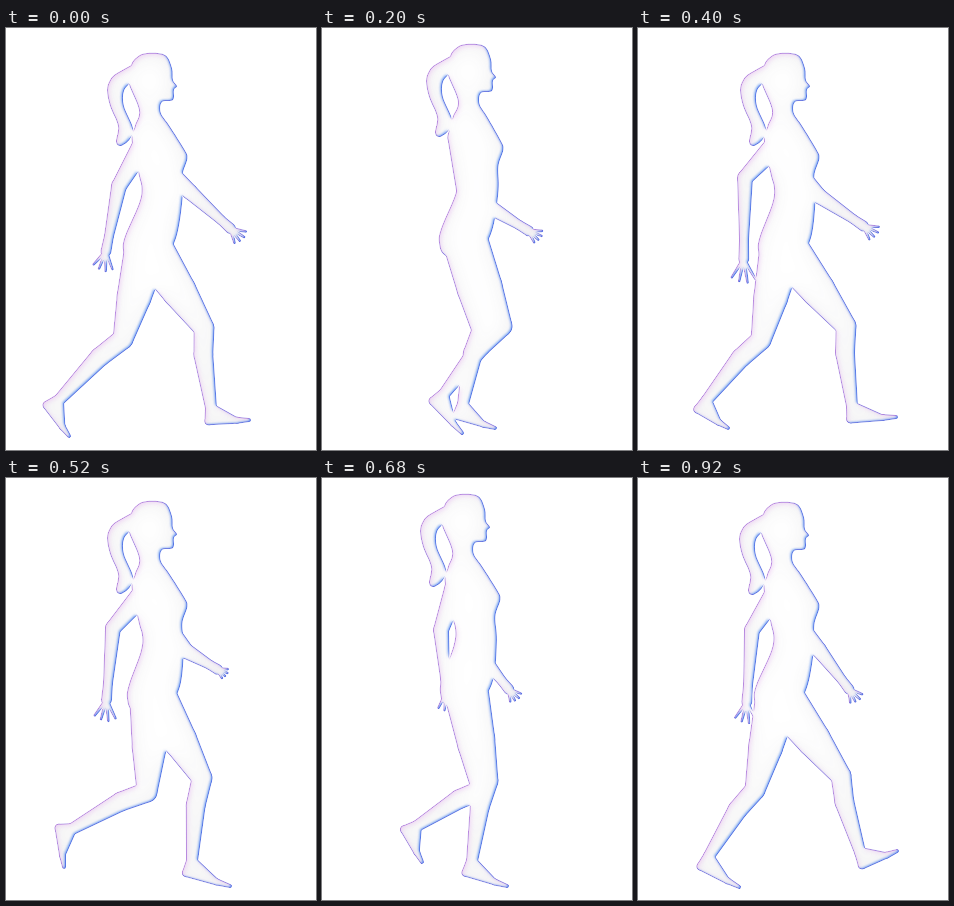
Recreate the animation shown at these times as an HTML page with a canvas. Size 310 by 422 pixels, loop 1000 ms.

```html
<!DOCTYPE html>
<html lang="en">
<head>
<meta charset="utf-8">
<title>Walk cycle</title>
<style>
html, body { margin: 0; width: 100%; height: 100%; overflow: hidden; background: #fff; }
canvas { display: block; }
</style>
</head>
<body>
<canvas id="stage" width="310" height="422"></canvas>
<script>
const W = 310, H = 422, STEPS = 15, LOOP = 1000;
const view = document.getElementById('stage').getContext('2d');
const layer = () => {
  const c = document.createElement('canvas');
  c.width = W;
  c.height = H;
  return c.getContext('2d');
};
const mask = layer(), outside = layer(), rim = layer();

// Contours of the standing body and the ponytail, as x, y pairs.
const BODY = [
  141,25, 159,27, 166,40, 167,52, 171,58, 168,62, 167,72, 156,74, 155,85, 164,98,
  179,121, 182,130, 177,147, 177,170, 171,207, 160,228, 140,240, 122,234, 117,222,
  119,208, 133,176, 136,160, 133,145, 126,112, 129,98, 133,82, 122,53, 125,37, 131,29
];
const TAIL = [
  130,36, 111,45, 104,52, 101,62, 104,78, 112,98, 110,114,
  115,118, 124,111, 127,100, 118,78, 118,63, 126,52
];

// Steps at which the poses below are set.
const KEYS = [0, 3, 6, 8, 10, 12, 14];
const LEG_KEYS = [0, 1.5, 3, 6, 8, 10, 12, 14];

// Head dx, dy and hip x.
const TRUNK = [[0,0,142], [3,-9,142], [1,0,145], [0,-2,146], [-3,-9,143], [-3,-11,142], [0,-1,141]];
// Knee, ankle, toe.
const FAR_LEG = [
  [198,300, 205,380, 243,392],
  [180,301, 174,379, 211,398],
  [160,302, 141,376, 173,400],
  [123,312, 69,372, 90,400],
  [141,314, 66,351, 58,389],
  [160,312, 95,348, 100,384],
  [183,293, 149,366, 178,393],
  [203,298, 222,374, 259,373]
];
const NEAR_LEG = [
  [117,311, 53,372, 63,408],
  [151,310, 80,358, 78,396],
  [180,298, 122,366, 140,405],
  [208,298, 214,378, 258,389],
  [196,300, 186,383, 224,408],
  [166,303, 150,383, 185,408],
  [145,303, 118,383, 151,409],
  [117,312, 71,378, 101,409]
];
// Elbow, wrist.
const NEAR_ARM = [
  [184,164, 215,192], [166,178, 197,197], [107,150, 106,212], [107,150, 102,205],
  [119,152, 123,200], [150,170, 166,208], [181,172, 204,202]
];
const FAR_ARM = [
  [113,158, 103,208], [143,168, 143,205], [181,168, 215,191], [180,173, 204,187],
  [158,176, 180,203], [130,155, 136,200], [114,152, 110,207]
];

const lerp = (a, b, f) => a + (b - a) * f;
const mix = (p, q, f) => [lerp(p[0], q[0], f), lerp(p[1], q[1], f)];
const ramp = (v, a, b) => Math.min(1, Math.max(0, (v - a) / (b - a)));
const polar = (p, a, r) => [p[0] + r * Math.cos(a), p[1] + r * Math.sin(a)];
const angle = (p, q) => Math.atan2(q[1] - p[1], q[0] - p[0]);
const dist = (p, q) => Math.hypot(q[0] - p[0], q[1] - p[1]);

// Periodic cubic through unevenly spaced rows.
function pose(keys, rows, k) {
  const n = keys.length;
  let i = n - 1;
  while (keys[i] > k) i--;
  const near = [i - 1, i, i + 1, i + 2];
  const [t0, t1, t2, t3] = near.map(j => keys[(j + n) % n] + STEPS * Math.floor(j / n));
  const d = t2 - t1, u = (k - t1) / d, v = 1 - u;
  return rows[0].map((_, c) => {
    const [a, b, e, f] = near.map(j => rows[(j + n) % n][c]);
    const m1 = (e - a) / (t2 - t0) * d, m2 = (f - b) / (t3 - t1) * d;
    return v * v * (1 + 2 * u) * b + u * v * v * m1 + u * u * (3 - 2 * u) * e - u * u * v * m2;
  });
}

function pairs(list) {
  const out = [];
  for (let i = 0; i < list.length; i += 2) out.push([list[i], list[i + 1]]);
  return out;
}

function blob(pts) {
  const n = pts.length, at = i => pts[(i + n) % n];
  mask.beginPath();
  mask.moveTo(...pts[0]);
  for (let i = 0; i < n; i++) {
    const [a, b, c, d] = [at(i - 1), at(i), at(i + 1), at(i + 2)];
    mask.bezierCurveTo(
      b[0] + (c[0] - a[0]) / 6, b[1] + (c[1] - a[1]) / 6,
      c[0] - (d[0] - b[0]) / 6, c[1] - (d[1] - b[1]) / 6, c[0], c[1]);
  }
  mask.fill();
}

// Tapered capsule between two circles.
function taper(p, r, q, s) {
  const a = angle(p, q);
  const b = Math.acos(Math.max(-1, Math.min(1, (r - s) / dist(p, q))));
  mask.beginPath();
  mask.arc(p[0], p[1], r, a + b, a - b + 2 * Math.PI);
  mask.arc(q[0], q[1], s, a - b, a + b);
  mask.fill();
}

function chain(...links) {
  for (let i = 0; i + 3 < links.length; i += 2) taper(...links.slice(i, i + 4));
}

function leg(rows, k, hip) {
  const [knee, ankle, toe] = pairs(pose(LEG_KEYS, rows, k));
  const top = [lerp(hip[0], knee[0], 0.11), hip[1]];
  const calf = polar(mix(knee, ankle, 0.33), angle(knee, ankle) + Math.PI / 2, 3);
  const heel = polar(ankle, angle(ankle, toe) + 1.43, 13);
  const ball = mix(heel, toe, 0.7);
  chain(top, 22, mix(top, knee, 0.5), 17.5, knee, 10.5, calf, 10, ankle, 6, heel, 4.5, ball, 3.5, toe, 2);
  taper(ankle, 5, ball, 3);
  mask.beginPath();
  for (const p of [ankle, heel, ball]) mask.lineTo(...p);
  mask.fill();
}

function arm(rows, k, shoulder) {
  const [elbow, wrist] = pairs(pose(KEYS, rows, k));
  const a = angle(elbow, wrist), len = 0.68 * dist(elbow, wrist);
  const palm = polar(wrist, a, len * 0.45);
  chain(shoulder, 11, elbow, 8, wrist, 5, palm, 5.5);
  for (let i = 0; i < 4; i++) {
    const tip = polar(wrist, a + (i - 1.5) * 0.2, len * (1.02 - 0.05 * Math.abs(i - 1.2)));
    taper(palm, 2.2, tip, 1.3);
  }
}

function figure(k) {
  const [dx, dy, hipX] = pose(KEYS, TRUNK, k);
  const head = [dx, dy], chest = [Math.min(dx, 0) - 0.6, dy + 0.5];
  const sway = [hipX - 142, dy * 0.8];
  const hip = [hipX, 226 + sway[1]];
  const shoulder = [137 + chest[0], 118 + chest[1]];
  const shift = ([x, y]) => {
    const d = mix(mix(head, chest, ramp(y, 80, 125)), sway, ramp(y, 150, 210));
    return [x + d[0], y + d[1]];
  };
  mask.clearRect(0, 0, W, H);
  blob(pairs(BODY).map(shift));
  blob(pairs(TAIL).map(([x, y]) => [x + dx, y + dy]));
  for (const rows of [FAR_LEG, NEAR_LEG]) leg(rows, k, hip);
  for (const rows of [FAR_ARM, NEAR_ARM]) arm(rows, k, shoulder);
}

// Shade the inside of the figure from its edge.
function edge(color, blur, dx, dy) {
  rim.globalCompositeOperation = 'source-over';
  rim.clearRect(0, 0, W, H);
  rim.shadowColor = color;
  rim.shadowBlur = blur;
  rim.shadowOffsetX = dx;
  rim.shadowOffsetY = dy;
  rim.drawImage(outside.canvas, 0, 0);
  rim.shadowColor = 'transparent';
  rim.globalCompositeOperation = 'destination-in';
  rim.drawImage(mask.canvas, 0, 0);
  view.drawImage(rim.canvas, 0, 0);
}

function paint(k) {
  figure(k);
  outside.globalCompositeOperation = 'source-over';
  outside.fillStyle = '#fff';
  outside.fillRect(0, 0, W, H);
  outside.globalCompositeOperation = 'destination-out';
  outside.drawImage(mask.canvas, 0, 0);

  view.fillStyle = '#fff';
  view.fillRect(0, 0, W, H);
  edge('rgba(90,90,100,0.1)', 24, 0, 0);
  edge('rgba(225,150,240,0.4)', 5, 1.5, 1.5);
  edge('rgba(60,130,240,0.8)', 2, -1.5, -1);
  edge('rgba(165,110,215,0.75)', 0, 1, 0);
  edge('rgba(165,110,215,0.75)', 0, 0, 1);
  edge('rgba(90,90,215,0.6)', 0, 0, -1);
  edge('rgba(70,100,225,0.7)', 0, -1, 0);
}

// Three drawings per 200 ms, held for 80, 40 and 80 ms.
function stepAt(t) {
  const r = t % 200;
  return 3 * Math.floor(t / 200) + (r >= 80) + (r >= 120);
}

let shown = -1;
function tick() {
  const k = stepAt(performance.now() % LOOP);
  if (k !== shown) paint(shown = k);
  requestAnimationFrame(tick);
}
tick();
</script>
</body>
</html>
```
